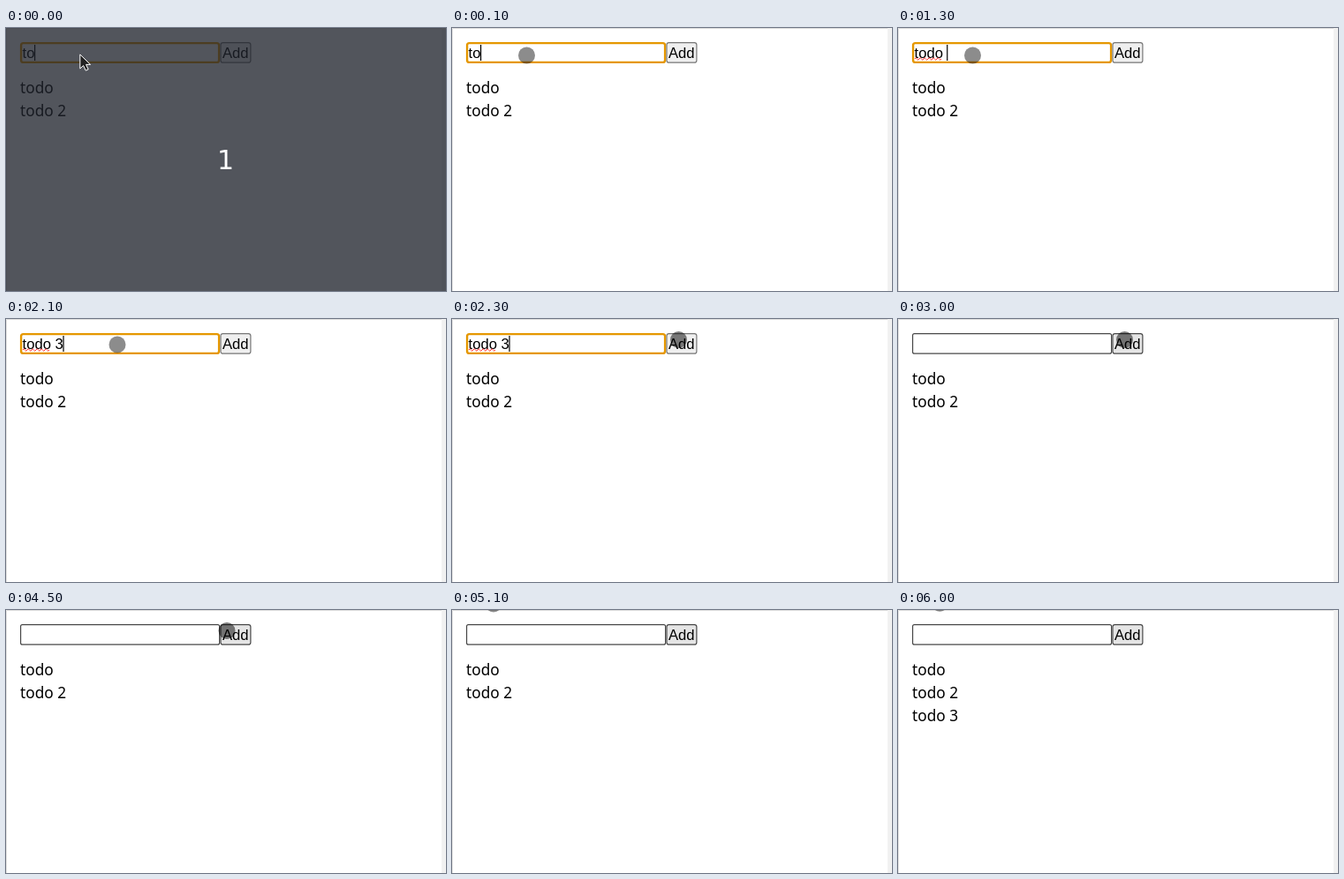
Write an HTML page that moves like this. It is 498 px wide and 298 px high and loops after 6.5 s.

```html
<!DOCTYPE html>
<html lang="en">
<head>
<meta charset="utf-8">
<title>Todo list</title>
<style>
  html, body { margin: 0; width: 100%; height: 100%; overflow: hidden; background: #fff; }
  svg { display: block; width: 498px; height: 298px; }
  text { white-space: pre; }
  .control { font: 16.667px "Liberation Sans", Arial, sans-serif; }
  .list { font: 17.3px "Noto Sans", "Open Sans", sans-serif; }
  .count { font: 30px "DejaVu Sans", sans-serif; text-anchor: middle; fill: #fff; }
</style>
</head>
<body>
<svg viewBox="0 0 498 298">
  <rect width="498" height="298" fill="#fff"/>
  <rect x="493" width="5" height="298" fill="#f1f1f1"/>
  <path d="M.5 298V.5H493" fill="none" stroke="#dcdcdc"/>

  <rect id="field" fill="#fff"/>
  <text id="typed" class="control" x="18.5" y="34"></text>
  <path id="squiggle" fill="none" stroke="#f00" stroke-opacity=".8"/>
  <rect id="caret" y="19" width="1.2" height="18"/>

  <rect id="button" x="243" y="16.6" width="33.9" height="22.6" rx="2.5" stroke-width="1.2"/>
  <text class="control" x="245" y="34">Add</text>

  <g class="list">
    <text x="16" y="74">todo</text>
    <text x="16" y="100">todo 2</text>
    <text id="added" x="16" y="126">todo 3</text>
  </g>

  <circle id="pointer" r="9.5"/>

  <g id="countdown">
    <rect width="498" height="298" fill="#1e222b" fill-opacity=".77"/>
    <path d="M83.8 30v16l3.8-3.4 2.6 5.6 3-1.3-2.6-5.5h5z" fill="#222" stroke="#fff"/>
    <text class="count" x="248.5" y="160">1</text>
  </g>
</svg>
<script>
const LOOP = 6500;
const el = id => document.getElementById(id);
const show = (id, on) => el(id).setAttribute("visibility", on ? "visible" : "hidden");
const set = (id, attrs) => {
  for (const name in attrs) el(id).setAttribute(name, attrs[name]);
};

// Each entry is [start in ms, value], held until the next one.
const typing = [[0, "to"], [600, "tod"], [800, "todo"], [1300, "todo "], [1600, "todo 3"], [2900, ""]];
const pointerPath = [
  [0, [84.5, 31]], [2100, [126, 29]], [2200, [222, 22]], [2300, [256.5, 23.5]],
  [4500, [250, 23.5]], [4600, [226, 21]], [4700, [182, 16]], [4800, [132, 10]],
  [4900, [92, 3]], [5000, [62, -4]], [5100, [47, -7]], [5200, [47.3, -7.8]]
];
const at = (steps, t) => steps.filter(([start]) => start <= t).pop()[1];

const focusedField = { x: 17.1, y: 17.1, width: 224, height: 21.8, rx: 2.5, stroke: "#e59700", "stroke-width": 2.4 };
const idleField = { x: 16.6, y: 16.6, width: 225, height: 22.6, rx: 2, stroke: "#484848", "stroke-width": 1.2 };

let wave = "M19 35q1.25 -2.4 2.5 0";
for (let x = 24; x <= 51; x += 2.5) wave += "t2.5 0";
set("squiggle", { d: wave });

function render(t) {
  const focused = t < 2700;
  const text = at(typing, t);
  const [cx, cy] = at(pointerPath, t);

  set("field", focused ? focusedField : idleField);
  set("button", { fill: focused ? "#efefef" : "#e5e5e5", stroke: focused ? "#767676" : "#484848" });
  set("pointer", { cx, cy, "fill-opacity": t >= 2300 && t < 4600 ? 0.5 : 0.45 });

  const typed = el("typed");
  if (typed.textContent !== text) typed.textContent = text;
  set("caret", { x: 18.5 + (text ? typed.getComputedTextLength() : 0) - 0.4 });

  show("caret", focused);
  show("squiggle", focused && t >= 1300);
  show("added", t >= 6000);
  show("pointer", t >= 100);
  show("countdown", t < 100);
}

const origin = performance.now();
function tick() {
  render((performance.now() - origin) % LOOP);
  requestAnimationFrame(tick);
}
tick();
</script>
</body>
</html>
```
